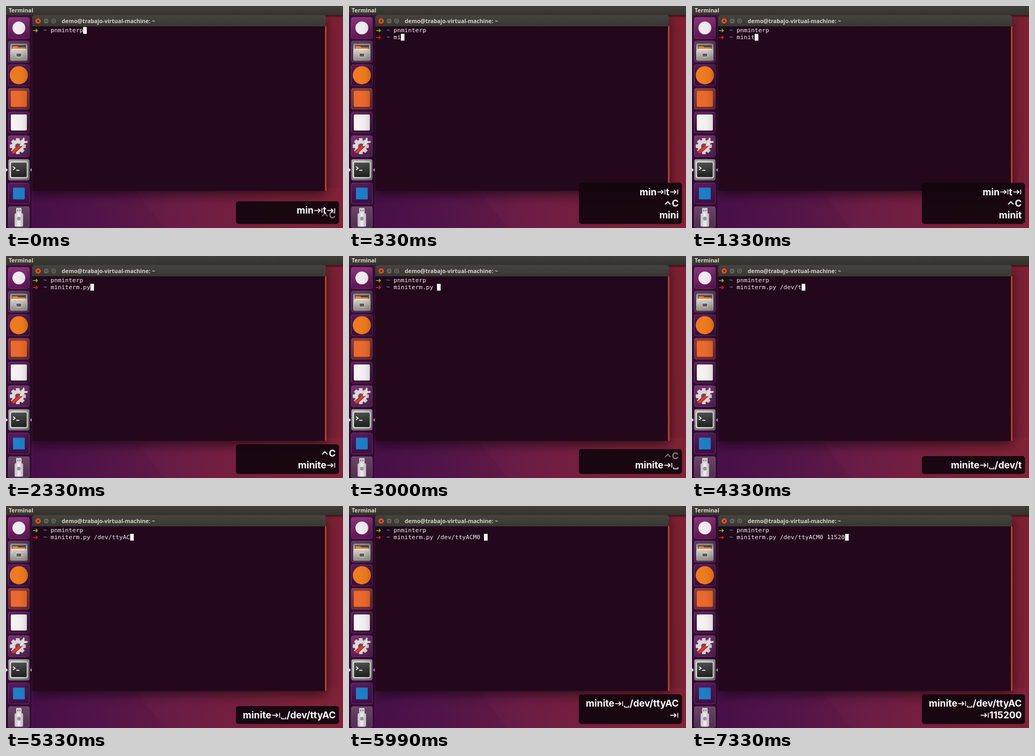
Animation, 629 px wide and 415 px high, one loop 7.99 s. Source, as an HTML page with a canvas:

```html
<!DOCTYPE html>
<html lang="en">
<head>
<meta charset="utf-8">
<title>Terminal</title>
<style>
  html, body { margin: 0; width: 629px; height: 415px; overflow: hidden; background: #22081b; }
  canvas { display: block; }
</style>
</head>
<body>
<canvas id="stage" width="629" height="415"></canvas>
<script>
const W = 629, H = 415, LOOP = 7990;
const stage = document.getElementById('stage');
const view = stage.getContext('2d');
const desk = document.createElement('canvas');
desk.width = W;
desk.height = H;
let g = desk.getContext('2d');

const UI = 'bold 10.4px "Open Sans", "Noto Sans", sans-serif';
const MONO = '11.2px "DejaVu Sans Mono", monospace';
const KEYS = 'bold 17.5px Inter, sans-serif';
const CELL = 6.75, LEFT = 49.5, LINE = 12.7;

function ramp(x0, y0, x1, y1, ...colors) {
  const r = g.createLinearGradient(x0, y0, x1, y1);
  colors.forEach((c, i) => r.addColorStop(i / (colors.length - 1), c));
  return r;
}
function rect(x, y, w, h, fill) {
  g.fillStyle = fill;
  g.fillRect(x, y, w, h);
}
function round(x, y, w, h, r, fill, stroke) {
  g.beginPath();
  g.roundRect(x, y, w, h, r);
  if (fill) { g.fillStyle = fill; g.fill(); }
  if (stroke) { g.strokeStyle = stroke; g.lineWidth = 1; g.stroke(); }
}
function disc(x, y, r, fill) {
  g.fillStyle = fill;
  g.beginPath();
  g.arc(x, y, r, 0, 7);
  g.fill();
}
function line(color, width, ...pts) {
  g.strokeStyle = color;
  g.lineWidth = width;
  g.beginPath();
  for (let i = 0; i < pts.length; i += 2) g.lineTo(pts[i], pts[i + 1]);
  g.stroke();
}
function poly(fill, ...pts) {
  g.fillStyle = fill;
  g.beginPath();
  for (let i = 0; i < pts.length; i += 2) g.lineTo(pts[i], pts[i + 1]);
  g.fill();
}
function text(s, x, y, font, fill) {
  g.font = font;
  g.fillStyle = fill;
  g.fillText(s, x, y);
}

// Launcher icons, drawn around the centre of their tile
function cabinet() {
  round(-16, -15, 32, 32, 2, ramp(0, -15, 0, 17, '#8b8782', '#e2dfda', '#a5a19b'));
  rect(-13, -12, 26, 8, '#4a4643');
  poly('#e8843c', -12, -10, -3, -10, -1, -8, 12, -8, 12, -4, -12, -4);
  rect(-13, -5, 26, 2, '#f0ece6');
  rect(-15, -2, 30, 18, ramp(0, -2, 0, 16, '#d0ccc6', '#918d87'));
  round(-5, 3, 10, 7, 1.5, '#5d5a56', '#efece8');
}
function gear() {
  g.save();
  g.translate(-2, 0);
  for (let i = 0; i < 8; i++) {
    g.rotate(Math.PI / 4);
    round(-3.5, -15, 7, 8, 1, '#d6d4d2');
  }
  g.restore();
  disc(-2, 0, 11.5, '#dddbd9');
  disc(-2, 0, 5, '#77466f');
  g.lineCap = 'round';
  line('#9c1f1c', 7, -10, 11, 3, -1);
  line('#d43c33', 5, -10, 11, 3, -1);
  line('#ecebea', 4.5, 4, -2, 10, -8);
  line('#ecebea', 3.5, 9, -14, 8, -7, 15, -8);
  g.lineCap = 'butt';
}
function prompt() {
  round(-16.5, -15.5, 33, 31, 3, '#c9c9c6', '#ecebe8');
  round(-14.5, -13.5, 29, 27, 2, ramp(0, -13, 0, 13, '#4c504d', '#1f2220'));
  line('#f2f2f0', 1.7, -11, -6, -7, -3, -11, 0);
  line('#f2f2f0', 1.7, -5, 1, 1, 1);
}
function stick() {
  rect(-5, -17, 10, 11, '#d9d7d9');
  rect(-3, -14, 2, 3, '#77717a');
  rect(1, -14, 2, 3, '#77717a');
  round(-8, -7, 16, 25, 2, ramp(-8, 0, 8, 0, '#bdbabd', '#f1eff1', '#b5b2b5'));
  disc(0, 3, 3.5, '#98949a');
}
const tiles = [
  ['#8c3279', '#5f1656', () => disc(0, 0, 12, '#f3edf1')],
  ['#5c3c5c', '#432a46', cabinet],
  ['#551a52', '#390c39', () => disc(0, 0, 17, '#ef7b1d')],
  ['#8a3f38', '#70282f', () => round(-15, -15, 30, 30, 2, '#ea6a2c')],
  ['#5a1e54', '#3d0f3a', () => round(-15, -15, 30, 30, 2, '#f4f3f2')],
  ['#76336f', '#562052', gear],
  ['#a7a6a6', '#777576', prompt],
  ['#581a5c', '#3d0d42', () => round(-11, -11, 22, 22, 1, '#1d7fc6')],
  ['#6b4567', '#4f2f50', stick]
];

function wallpaper() {
  rect(0, 0, W, H, ramp(49, 390, W, 320, '#470f48', '#541548', '#681a42', '#761d39', '#7d2035'));
  poly('rgba(255,120,120,.03)', 238, 340, 296, H, W, H, W, 340);
  rect(48, 17, W, 5, ramp(0, 17, 0, 22, 'rgba(0,0,0,.5)', 'rgba(0,0,0,0)'));
}
function launcher() {
  rect(0, 17, 48, H, ramp(0, 17, 0, H, '#430f3c', '#370a34', '#370a37'));
  rect(48, 17, 1, H, '#4c1c46');
  tiles.forEach(([top, low, icon], i) => {
    const y = 41 + 44.2 * i;
    round(4.5, y - 19.5, 39, 39, 3, ramp(0, y - 19, 0, y + 19, top, low), 'rgba(255,255,255,.18)');
    g.save();
    g.translate(24, y);
    icon();
    g.restore();
  });
  poly('#e6e0e4', 0, 303, 3.5, 306.5, 0, 310);
  poly('#e6e0e4', 48, 303, 44.8, 306.5, 48, 310);
}
function terminal() {
  g.save();
  g.shadowColor = 'rgba(0,0,0,.65)';
  g.shadowBlur = 22;
  g.shadowOffsetY = 5;
  rect(49, 20, 548, 325.5, '#230a1d');
  g.restore();
  round(49, 17, 548, 21, [4, 4, 0, 0], ramp(0, 17, 0, 38, '#44433e', '#393833'));
  rect(49, 38, 547, 307.5, '#23081b');
  rect(595.5, 38, 2.5, 307.5, '#ca4a22');
  disc(60, 28, 5.7, '#33302c');
  disc(60, 28, 5, '#ea5524');
  line('#5b2113', 1.3, 58, 26, 62, 30);
  line('#5b2113', 1.3, 62, 26, 58, 30);
  for (const x of [75, 89]) {
    disc(x, 28, 5.5, '#33322e');
    disc(x, 28, 4.8, '#66655f');
  }
  line('#35342f', 1.3, 72.5, 28, 77.5, 28);
  round(87, 26, 4, 4, 0, null, '#35342f');
  text('demo@trabajo-virtual-machine: ~', 104, 32, UI, '#d5d1c8');
}
function menu() {
  rect(0, 0, W, 17, ramp(0, 0, 0, 17, '#403f3a', '#34332e'));
  text('Terminal', 5, 12, UI, '#dfdbd2');
}

wallpaper();
launcher();
terminal();
menu();
g = view;

function shell(row, arrow, typed, cursor) {
  const y = 39.3 + LINE * row, base = y + 10;
  text('\u279C', 49.5, base + .6, '13px "DejaVu Sans", sans-serif', arrow);
  text('~', LEFT + 3 * CELL, base, 'bold ' + MONO, '#2a9fc4');
  text(typed, LEFT + 5 * CELL, base, MONO, '#f0eef0');
  if (cursor) rect(LEFT + (5 + typed.length) * CELL, y, CELL, LINE, '#ffffff');
}

// Key symbols: width and drawing from the left end, y is the baseline
const marks = {
  '\u21E5': [17.5, (x, y) => {
    line('#fff', 1.6, x + 1.5, y - 6, x + 12, y - 6);
    line('#fff', 1.6, x + 8.5, y - 9.5, x + 12.3, y - 6, x + 8.5, y - 2.5);
    line('#fff', 1.5, x + 15.5, y - 10.5, x + 15.5, y - 1.5);
  }],
  '\u2423': [11, (x, y) => line('#fff', 1.4, x + 1.5, y - 2.5, x + 1.5, y + .6, x + 9.5, y + .6, x + 9.5, y - 2.5)],
  '\u2303': [14, (x, y) => line('#fff', 2, x + 1.5, y - 4.5, x + 6.5, y - 9.5, x + 11.5, y - 4.5)]
};
function keys(s, y) {
  g.font = KEYS;
  g.fillStyle = '#fff';
  let x = 615.5;
  for (const part of s.split(/([\u21E5\u2423\u2303])/).reverse()) {
    const mark = marks[part];
    x -= mark ? mark[0] : g.measureText(part).width;
    if (mark) mark[1](x, y);
    else g.fillText(part, x, y);
  }
}
// Each row is [keys, baseline, opacity]
function overlay(top, rows) {
  round(429, top, 192.5, 407.5 - top, 5, 'rgba(17,5,13,.92)');
  for (const [s, y, alpha = 1] of rows) {
    g.globalAlpha = alpha;
    keys(s, y);
  }
  g.globalAlpha = 1;
}

const LOW = 397.2, MID = LOW - 21.8, HIGH = MID - 21.8;
const T1 = 374, T2 = 352, T3 = 330.5;
const tabs = 'min⇥t⇥', stop = '⌃C', path = 'minite⇥␣/dev/ttyAC';
const three = (s, a = 1) => [[tabs, HIGH, a], [stop, MID], [s, LOW]];
const one = n => [[path.slice(0, n), LOW]];
const full = 'miniterm.py /dev/ttyACM0 11520';

// [start, characters typed, panel top, panel rows]; -1 is before the second prompt
const steps = [
  [0, -1, 365, [[tabs, 388.3], [stop, LOW, .45]]],
  [330, 2, T3, three('mini')],
  [1000, 4, T3, three('mini')],
  [1330, 5, T3, three('minit')],
  [1990, 6, T3, three('minite⇥', .55)],
  [2330, 11, T2, [[stop, MID], ['minite⇥', LOW]]],
  [3000, 12, 361, [[stop, MID + 5, .45], ['minite⇥␣', LOW]]],
  [3330, 13, T1, one(9)],
  [4000, 16, T1, one(12)],
  [4330, 18, T1, one(14)],
  [4990, 20, T1, one(16)],
  [5330, 22, T1, one(18)],
  [5990, 25, T2, [[path, MID], ['⇥', LOW]]],
  [6990, 27, T2, [[path, MID], ['⇥115', LOW]]],
  [7330, 30, T2, [[path, MID], ['⇥115200', LOW]]]
];

function draw(t) {
  const [, typed, top, rows] = steps.findLast(s => s[0] <= t);
  g.drawImage(desk, 0, 0);
  shell(0, '#6cc91c', 'pnminterp', typed < 0);
  if (typed >= 0) shell(1, '#e0201f', full.slice(0, typed), true);
  overlay(top, rows);
}

const begin = performance.now();
function tick(now) {
  draw(Math.max(0, now - begin) % LOOP);
  requestAnimationFrame(tick);
}
draw(0);
requestAnimationFrame(tick);
</script>
</body>
</html>
```
